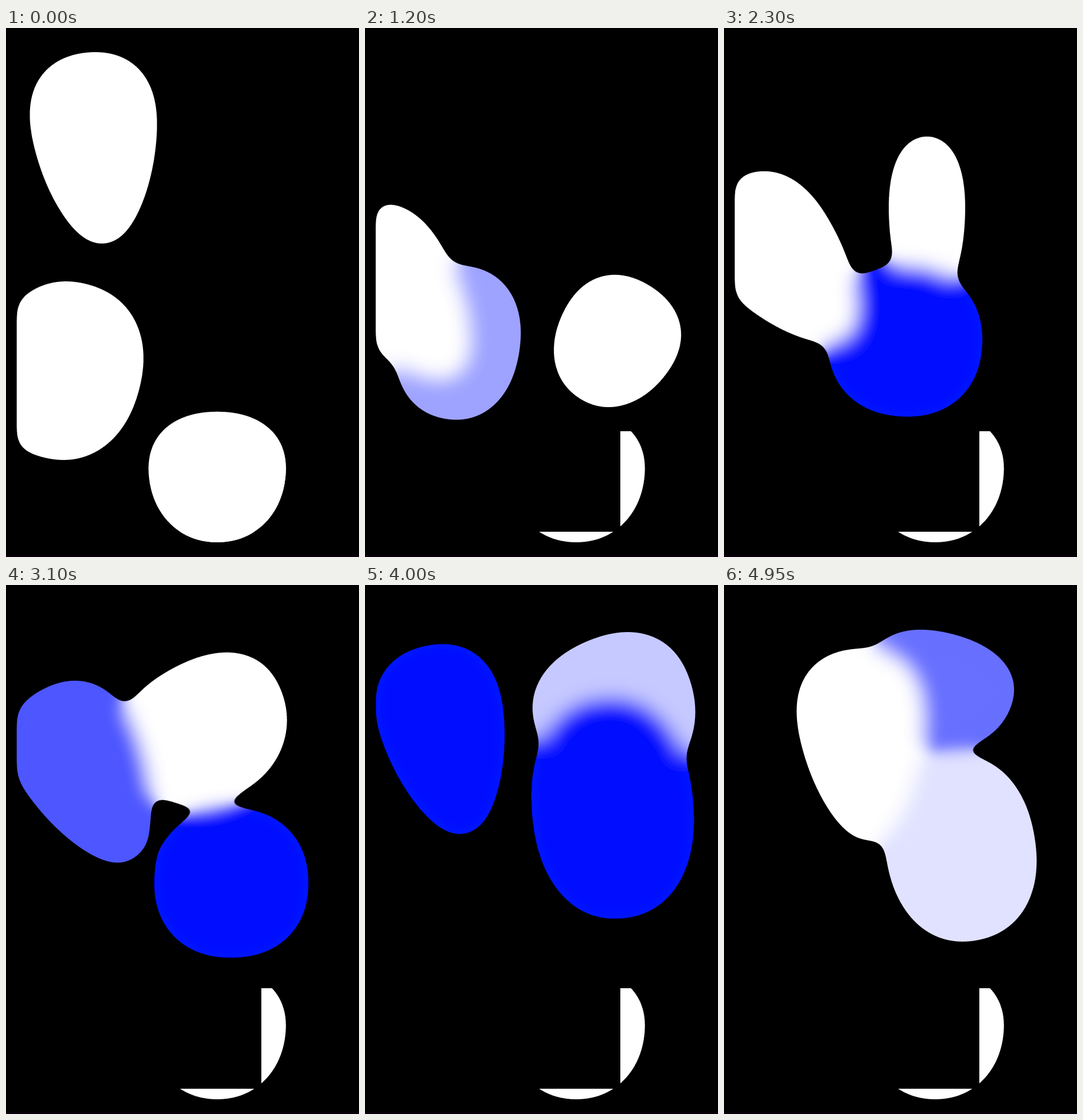
Recreate the animation shown at these times as an HTML page. Size 600 by 900 pixels, loop 5000 ms.

```html
<!DOCTYPE html>
<html lang="en">
<head>
<meta charset="utf-8">
<title>Gooey blobs</title>
<style>
  html, body { margin: 0; width: 100%; height: 100%; overflow: hidden; background: #000; }
  svg { display: block; width: 100vw; height: 100vh; }
</style>
</head>
<body>
<svg viewBox="0 0 600 900">
  <defs>
    <filter id="goo" filterUnits="userSpaceOnUse" x="-60" y="-60" width="720" height="1020">
      <feGaussianBlur stdDeviation="16"/>
      <feColorMatrix values="1 0 0 0 0  0 1 0 0 0  0 0 1 0 0  0 0 0 40 -18.7"/>
    </filter>
    <clipPath id="wall"><path d="M19 0H600V900H19Z"/></clipPath>
    <clipPath id="corner"><path d="M434 686H600V900H0V857H434Z"/></clipPath>
  </defs>
  <rect width="600" height="900"/>
  <rect y="896" width="600" height="4" fill="#080008"/>
  <g clip-path="url(#corner)"><g filter="url(#goo)"><path id="rest" fill="#fff"/></g></g>
  <g filter="url(#goo)"><g id="blobs" clip-path="url(#wall)"></g></g>
</svg>
<script>
const LOOP = 5000, STEP = 50, CORNERS = 48;
const { sin, cos, sign, abs, PI } = Math;

// Painted back to front. Keys hold time and centre, then radii where the blob stretches.
// blue: fade in from, to; fade out from, to.
const BLOBS = [
  {
    keys: [[0, 359, 764, 116, 111], [50, 319, 749, 116, 111], [700, 280, 603, 98, 108],
           [1200, 425, 535, 102, 113], [1650, 397, 490, 114, 115], [2300, 345, 325, 64, 142],
           [3100, 340, 248, 145, 120], [4000, 428, 218, 136, 132], [4400, 425, 172, 132, 113],
           [4950, 365, 178, 126, 97]],
    taper: -.1,
    tilt: t => 32 * sin(2 * PI * t / 4600),
    blue: [3420, 6000, 9000, 9001]
  },
  {
    keys: [[0, 100, 583, 130, 152], [700, 80, 545, 104, 142], [1650, 240, 532, 112, 124],
           [2300, 308, 533, 131, 128], [3100, 383, 507, 131, 127], [4000, 421, 380, 137, 188],
           [4950, 402, 448, 127, 159]],
    taper: 0,
    tilt: t => 15 - 25 * t / LOOP,
    blue: [800, 1850, 4000, 5080]
  },
  {
    keys: [[0, 153, 205], [700, 35, 300], [1200, 60, 455], [1650, 85, 452],
           [2300, 103, 398], [3100, 138, 323], [4000, 137, 264], [4950, 236, 272]],
    size: [102, 164],
    taper: -.3,
    tilt: t => -5 - 37 * sin(PI * (t / LOOP) ** .7) ** 2,
    blue: [2300, 3450, 4000, 4900]
  }
];

const ramp = (t, a, b) => Math.min(1, Math.max(0, (t - a) / (b - a)));

// Smooth path through unevenly timed keys; returns every value after the time.
function pose(keys, t) {
  const last = keys.length - 1;
  let i = 0;
  while (i < last - 1 && t >= keys[i + 1][0]) i++;
  const a = keys[i], b = keys[i + 1], span = b[0] - a[0];
  const u = ramp(t, a[0], b[0]), u2 = u * u, u3 = u2 * u;
  const slope = (k, j) => {
    const p = keys[Math.max(0, k - 1)], n = keys[Math.min(last, k + 1)];
    return (n[j] - p[j]) / (n[0] - p[0]);
  };
  return a.map((v, j) => v + (b[j] - v) * (3 * u2 - 2 * u3) +
    span * (slope(i, j) * (u3 - 2 * u2 + u) + slope(i + 1, j) * (u3 - u2))).slice(1);
}

// A slightly squared, tapered and tilted ellipse.
function outline(blob, t) {
  const [cx, cy, w = blob.size[0], h = blob.size[1]] = pose(blob.keys, t);
  const tilt = blob.tilt(t) * PI / 180, c = cos(tilt), s = sin(tilt);
  const square = v => sign(v) * abs(v) ** .9;
  const pts = Array.from({ length: CORNERS }, (_, k) => {
    const a = 2 * PI * k / CORNERS, v = square(sin(a));
    const x = w * square(cos(a)) * (1 + blob.taper * v), y = h * v;
    return (cx + x * c - y * s).toFixed(2) + " " + (cy + x * s + y * c).toFixed(2);
  });
  return "M" + pts.join("L") + "Z";
}

function color([a, b, c, d], t) {
  const blue = ramp(t, a, b) - ramp(t, c, d);
  const mix = to => Math.round(255 + (to - 255) * blue);
  return `rgb(${mix(0)},${mix(13)},255)`;
}

const group = document.getElementById("blobs");
const paths = BLOBS.map(() =>
  group.appendChild(document.createElementNS("http://www.w3.org/2000/svg", "path")));
document.getElementById("rest").setAttribute("d", outline(BLOBS[0], 0));

function draw(t) {
  BLOBS.forEach((blob, n) => {
    paths[n].setAttribute("d", outline(blob, t));
    paths[n].setAttribute("fill", color(blob.blue, t));
  });
}

const begin = performance.now();
function tick() {
  const t = (performance.now() - begin) % LOOP;
  draw(Math.floor(t / STEP) * STEP);
  requestAnimationFrame(tick);
}
draw(0);
requestAnimationFrame(tick);
</script>
</body>
</html>
```
